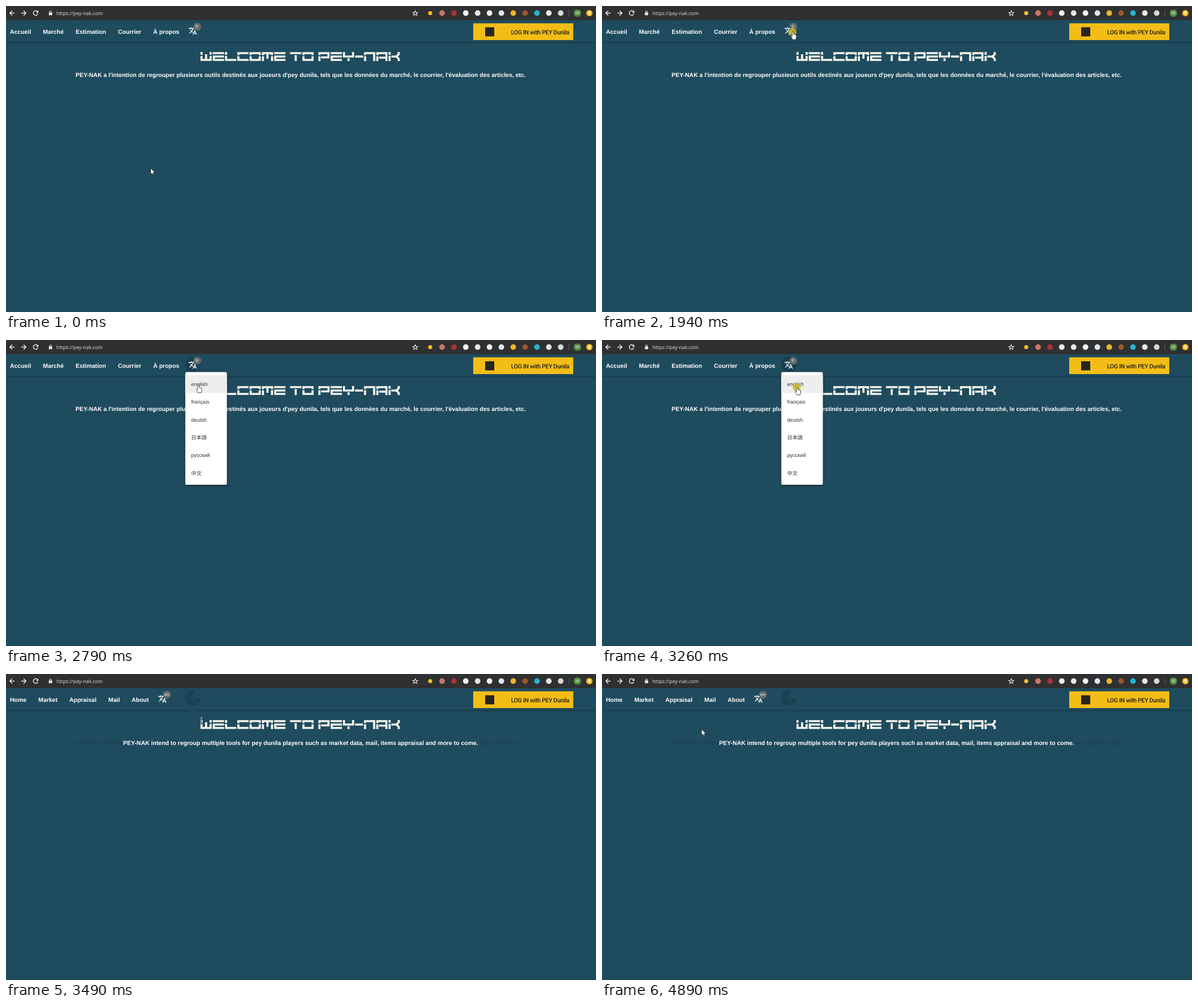
Recreate the animation shown at these times as an HTML page. Size 1038 by 539 pixels, loop 5060 ms.

```html
<!DOCTYPE html>
<html lang="fr">
<head>
<meta charset="utf-8">
<title>PEY-NAK</title>
<style>
html, body { margin: 0; width: 100%; height: 100%; overflow: hidden; background: #1f4b5e; }
svg { display: block; width: 100vw; height: 100vh; }
text { text-rendering: geometricPrecision; white-space: pre; }
.bold { font: bold 10.44px "Liberation Sans", Arial, sans-serif; fill: #fff; }
.mid { text-anchor: middle; }
.url { font: 8.7px "Open Sans", "Noto Sans", sans-serif; fill: #e4e6e9; }
.login { font: 500 10.6px Roboto, sans-serif; letter-spacing: -.35px; fill: #27251c; }
.badge { font: 8px "Open Sans", sans-serif; fill: #f4f4f4; text-anchor: middle; }
.item { font: 9.15px "Liberation Sans", "Noto Sans CJK JP", "Noto Sans CJK", sans-serif; fill: #333; }
.user { font: 8px "Open Sans", sans-serif; fill: #fff; text-anchor: middle; }
.line { fill: none; stroke: #eceef0; stroke-width: 1.4; }
#title { fill: none; stroke: #f4f4ec; stroke-width: 3.7; }
#beam { fill: none; stroke: #fff; mix-blend-mode: difference; }
</style>
</head>
<body>
<svg viewBox="0 0 1038 539" preserveAspectRatio="none">
  <defs>
    <linearGradient id="shade" x2="0" y2="1">
      <stop offset="0" stop-color="#0c2530" stop-opacity=".42"/>
      <stop offset="1" stop-color="#0c2530" stop-opacity="0"/>
    </linearGradient>
    <filter id="drop" x="-20%" y="-10%" width="140%" height="120%">
      <feDropShadow dx="0" dy="1" stdDeviation="2.2" flood-color="#001018" flood-opacity=".6"/>
    </filter>
    <clipPath id="sides"><path d="M100 110H204V132H100ZM833 110H930V132H833Z"/></clipPath>
    <path id="glyph" transform="scale(.667)" d="M12.87 15.07l-2.54-2.51.03-.03c1.74-1.94 2.98-4.17 3.71-6.53H17V4h-7V2H8v2H1v1.99h11.17C11.5 7.92 10.44 9.75 9 11.35 8.07 10.32 7.3 9.19 6.69 8h-2c.73 1.63 1.73 3.17 2.98 4.56l-5.09 5.02L4 19l5-5 3.11 3.11.76-2.04zM18.5 10h-2L12 22h2l1.12-3h4.75L21 22h2l-4.5-12zm-2.62 7l1.62-4.33L19.12 17h-3.24z"/>
  </defs>

  <rect width="1038" height="539" fill="#1f4b5e"/>
  <rect y="63" width="1038" height="4" fill="url(#shade)"/>

  <g id="bar">
    <rect width="1038" height="25" fill="#2f3032"/>
    <rect width="1038" height="1" fill="#24303a"/>
    <path class="line" d="M15 12.5H7M11 8.3L6.8 12.5L11 16.7M27 12.5H35M31 8.3L35.2 12.5L31 16.7M55.4 9.7A4.1 4.1 0 1 0 56 14"/>
    <path d="M57 8V12.2H52.8Z" fill="#eceef0"/>
    <rect x="75.4" y="11.3" width="5.8" height="5" rx=".6" fill="#e4e6e9"/>
    <path class="line" style="stroke-width:1" d="M76.7 11.5V10.2a1.6 1.6 0 0 1 3.2 0V11.5"/>
    <text class="url" x="88.7" y="15.8">https://pey-nak.com</text>
    <path class="line" style="stroke-width:1.1" d="M720 8.4L721.2 11.3L724.3 11.5L721.9 13.5L722.7 16.6L720 14.9L717.3 16.6L718.1 13.5L715.7 11.5L718.8 11.3Z"/>
    <g id="dots"></g>
    <path d="M990.5 7V18" stroke="#5a5c5f"/>
    <circle cx="1005.3" cy="12.5" r="6.6" fill="#4f8a3c"/>
    <text class="user" x="1005.3" y="15.4">M</text>
    <circle cx="1026.3" cy="12.5" r="5.5" fill="#f2b91c"/>
    <path d="M1026.3 9L1029.2 12.3H1027.3V15.5H1025.3V12.3H1023.4Z" fill="#fff"/>
  </g>

  <rect x="822" y="30.5" width="176" height="29.5" fill="#f3bd17"/>
  <rect x="843" y="37.5" width="16" height="16" fill="#27251c"/>
  <text class="login" x="888.5" y="50">LOG IN with PEY Dunila</text>

  <g id="halo">
    <circle cx="328.8" cy="42.5" r="13.3" fill="#183e4f"/>
    <g id="trace">
      <use href="#glyph" x="320.4" y="36.2" fill="#1f4b5e"/>
      <circle cx="336.5" cy="36.5" r="7" fill="#1f4b5e"/>
    </g>
  </g>
  <g id="nav"></g>
  <g id="lang">
    <use href="#glyph" x="320.4" y="36.2" fill="#fff"/>
    <circle cx="336.5" cy="36.5" r="7" fill="#62686b"/>
    <text id="code" class="badge" x="336.4" y="39.2"></text>
  </g>

  <g id="title" role="img" aria-label="WELCOME TO PEY-NAK"></g>
  <text id="ghost" class="bold mid" x="518.4" y="125.2" clip-path="url(#sides)" style="fill:#1a4253"></text>
  <text id="intro" class="bold mid" x="518.4" y="125.2"></text>

  <g id="menu">
    <rect x="315.5" y="56.5" width="73" height="198.5" rx="2.6" fill="#fff" filter="url(#drop)"/>
    <rect id="hover" x="315.5" y="62" width="73" height="31.4" fill="#eee"/>
  </g>

  <circle id="click" r="7.2" fill="#d0bd18" opacity=".78"/>
  <path id="arrow" d="M0 0V11.2L2.6 8.8L4.3 12.6L6 11.8L4.4 8.2H7.8Z" fill="#fff" stroke="#111" stroke-width=".8"/>
  <path id="hand" d="M-1.4 1.2Q0 -.6 1.4 1.2V5.4Q2.8 4.8 3.4 6Q4.8 5.4 5.2 6.7Q6.4 6.4 6.4 8V11Q6.3 12.8 5.4 15.4H-.8Q-1.6 12.8 -4.2 9.6Q-4 7.6 -1.4 9.2Z" fill="#fff" stroke="#222" stroke-width=".9"/>
  <path id="beam" d="M-2 -5.5H2M-2 5.5H2M0 -5.5V5.5"/>
</svg>
<script>
const LOOP = 5060;
const $ = id => document.getElementById(id);

function add(parent, tag, attrs, text) {
  const node = document.createElementNS("http://www.w3.org/2000/svg", tag);
  for (const key in attrs) node.setAttribute(key, attrs[key]);
  if (text) node.textContent = text;
  return $(parent).appendChild(node);
}

const words = {
  fr: {
    nav: [["Accueil", 7], ["Marché", 65], ["Estimation", 122.5], ["Courrier", 197], ["À propos", 259]],
    intro: "PEY-NAK a l'intention de regrouper plusieurs outils destinés aux joueurs d'pey dunila, tels que les données du marché, le courrier, l'évaluation des articles, etc.",
    shift: 0
  },
  en: {
    nav: [["Home", 7], ["Market", 57], ["Appraisal", 111.5], ["Mail", 180], ["About", 221]],
    intro: "PEY-NAK intend to regroup multiple tools for pey dunila players such as market data, mail, items appraisal and more to come.",
    shift: -53.4
  }
};

// Stencil letters on a 20 by 16 grid
const letters = {
  W: "M2 0V5M2 7V14H18V7M18 5V0M10 4V13",
  E: "M20 2H0M20 8H2V14H20",
  L: "M2 0V5M2 7V14H20",
  C: "M20 2H2V5.5M2 7.5V14H20",
  O: "M2 5.5V2H18V5.5M2 7.5V14H18V7.5",
  M: "M2 16V7.5M2 5.5V2H18V5.5M18 7.5V16M10 3V12",
  T: "M0 2H20M10 5.5V16",
  P: "M2 16V7.5M2 5.5V2H18V9.5H5",
  Y: "M2 0V8H18V0M10 11V16",
  N: "M2 16V7.5M2 5.5V2H18V16",
  A: "M2 16V7.5M2 5.5V2H18V16M5 10H16",
  K: "M2 0V5M2 7V16M18 0V4L14 8H5M14 8L18 12V16",
  "-": "M0 8H14"
};

let penX = 342;
for (const ch of "WELCOME TO PEY-NAK") {
  if (letters[ch]) add("title", "path", { d: letters[ch], transform: `translate(${penX} 81)` });
  penX += ch === " " ? 6.5 : ch === "-" ? 15.5 : 21.6;
}

["#f0c02a", "#c9786a", "#a83236", "#f0f0f0", "#e6e6e6", "#f4f4f4", "#dfe8f2", "#f0b52a", "#96582e", "#27b4d2", "#e8e8e8", "#d8d8d8"]
  .forEach((fill, i) => add("dots", "circle", { cx: 746.3 + i * 20.87, cy: 12.5, r: i ? 4.9 : 3.6, fill }));

["english", "français", "deutsh", "日本語", "русский", "中文"]
  .forEach((name, i) => add("menu", "text", { class: "item", x: 325.8, y: 81 + i * 31.3 }, name));

const links = words.fr.nav.map(() => add("nav", "text", { class: "bold", y: 49.3 }));
$("ghost").textContent = words.fr.intro;

let shown = "";
function setLanguage(code) {
  if (code === shown) return;
  shown = code;
  const set = words[code];
  set.nav.forEach(([label, x], i) => {
    links[i].textContent = label;
    links[i].setAttribute("x", x);
  });
  $("intro").textContent = set.intro;
  $("code").textContent = code;
  $("lang").setAttribute("transform", `translate(${set.shift} 0)`);
}

// Progress in n equal jumps, the first at start and the last at end
function jumps(t, start, end, n) {
  if (t < start) return 0;
  return Math.min(1, (Math.floor((t - start) * (n - 1) / (end - start) + .02) + 1) / n);
}
const smooth = p => p * p * (3 - 2 * p);
const mix = (a, b, p) => a + (b - a) * p;
const bend = (a, b, c, p) => mix(mix(a, b, p), mix(b, c, p), p);
const show = (id, on) => $(id).style.display = on ? "" : "none";

function pointer(t) {
  if (t < 2480) {
    const p = smooth(jumps(t, 80, 540, 7));
    return [bend(254.5, 335, 336, p), bend(285.5, 165, 45, p), p < 1 ? "arrow" : "hand"];
  }
  if (t < 4580) {
    const p = jumps(t, 2480, 2960, 7);
    const x = mix(336, 343.5, p * p);
    const y = mix(45, 82.5, smooth(Math.min(1, p * 1.4)));
    return [x, y, t < 3340 ? "hand" : "beam"];
  }
  const p = smooth(jumps(t, 4580, 4890, 5));
  return [mix(343.5, 175, p), mix(82.5, 97, p), "arrow"];
}

function draw(t) {
  const english = t >= 3340;
  setLanguage(english ? "en" : "fr");

  const [x, y, shape] = pointer(t);
  for (const id of ["arrow", "hand", "beam"]) show(id, id === shape);
  $(shape).setAttribute("transform", `translate(${x} ${y})` + (shape === "hand" ? " scale(.92)" : ""));

  show("click", t >= 1940 && t < 2017 || t >= 3260 && t < 3340);
  $("click").setAttribute("cx", x - .8);
  $("click").setAttribute("cy", y + 1);

  show("halo", t >= 2017);
  show("trace", english);
  $("halo").setAttribute("opacity", english ? .75 : 1);
  show("ghost", english);

  const open = Math.max(0, (jumps(t, 1940, 2170, 4) - .25) / .75);
  const fade = t < 3340 ? 1 : t < 3415 ? .91 : t < 3490 ? .4 : 0;
  const sx = .75 + .25 * open;
  show("menu", open * fade > 0);
  $("menu").setAttribute("opacity", open * fade);
  $("menu").setAttribute("transform", `translate(328 57) scale(${sx} ${sx * sx}) translate(-328 -57)`);
  show("hover", y > 62 && !english);
}

function tick() {
  draw(performance.now() % LOOP);
  requestAnimationFrame(tick);
}
tick();
</script>
</body>
</html>
```
